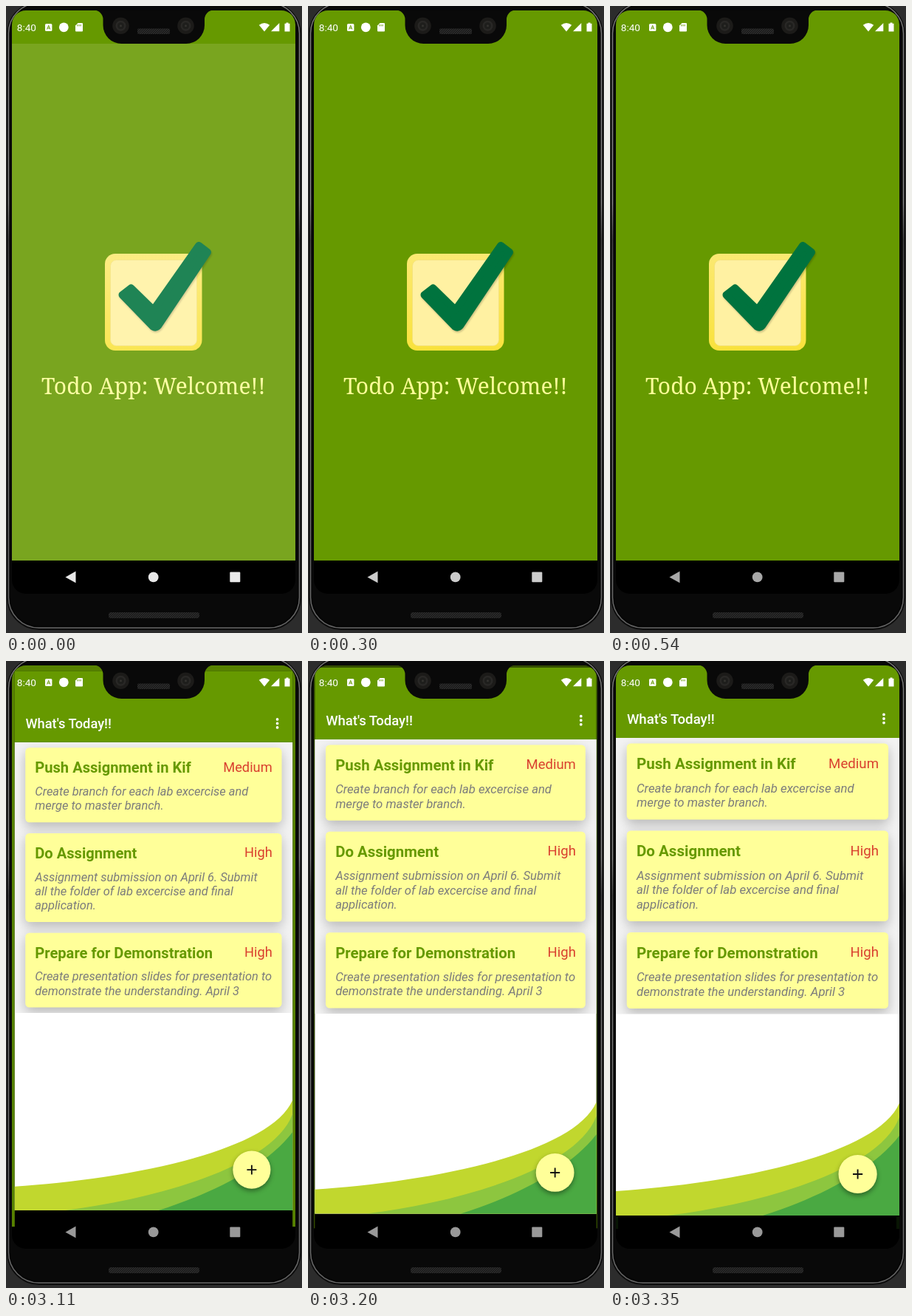
Recreate the animation shown at these times as an HTML page. Size 401 by 848 pixels, loop 5.68 s.

```html
<!DOCTYPE html>
<html lang="en">
<head>
<meta charset="utf-8">
<title>Todo app start</title>
<style>
  html, body { margin: 0; width: 100%; height: 100%; overflow: hidden; background: #2c2c2c; }
  svg { display: block; width: 401px; height: 848px; }
  text { font-family: Roboto, sans-serif; }
  .welcome { font: 30px "Noto Serif", serif; fill: #ff9; text-anchor: middle; }
  .heading { font-size: 18.67px; font-weight: 500; fill: #fff; }
  .clock { font-size: 13.6px; fill: #fff; }
  .task { font-size: 20.53px; font-weight: 700; fill: #690; }
  .priority { font-size: 18.67px; fill: #d9402f; text-anchor: end; }
  .note { font-size: 16.8px; font-style: italic; fill: #7c7c7c; }
  .card { fill: #ff9; filter: drop-shadow(0 6px 8px rgba(0, 0, 0, .25)); }
  .fab { fill: #ff9; filter: drop-shadow(0 3px 3px rgba(0, 0, 0, .4)); }
  .check { fill: #00733e; stroke: #00733e; filter: drop-shadow(1px 2px 1px rgba(0, 0, 0, .2)); }
</style>
</head>
<body>
<svg viewBox="0 0 401 848">
  <defs>
    <clipPath id="screen"><rect x="8" y="6" width="384" height="789" rx="19"/></clipPath>
    <clipPath id="list"><rect x="8" y="104" width="384" height="373.5"/></clipPath>
    <linearGradient id="frame" x2="0" y2="1">
      <stop stop-color="#777"/><stop offset=".32" stop-color="#888"/>
      <stop offset=".38" stop-color="#444"/><stop offset=".6" stop-color="#777"/>
      <stop offset="1" stop-color="#666"/>
    </linearGradient>
    <linearGradient id="box" x2="0" y2="1">
      <stop stop-color="#fbe972"/><stop offset="1" stop-color="#f9e23c"/>
    </linearGradient>
    <pattern id="mesh" width="3" height="3" patternUnits="userSpaceOnUse">
      <rect width="3" height="3" fill="#1b1b1b"/><path d="M0 3L3 0" stroke="#333"/>
    </pattern>
  </defs>

  <!-- Phone body -->
  <rect width="401" height="848" fill="#2c2c2c"/>
  <rect x="1" y="-6" width="399" height="850" rx="44" fill="#0c0c0c"/>
  <rect x="3.5" y="-4" width="394" height="845" rx="41" fill="#060606" stroke="url(#frame)" stroke-width="1.5"/>
  <rect x="6" y="-2" width="389" height="840" rx="38" fill="#090909"/>
  <rect x="139" y="820" width="123" height="8" rx="3" fill="url(#mesh)"/>

  <g clip-path="url(#screen)">
    <rect x="8" y="6" width="384" height="789"/>

    <g id="splash">
      <rect x="8" y="6" width="384" height="744" fill="#690"/>
      <rect x="134" y="335" width="131.5" height="131" rx="14" fill="url(#box)"/>
      <rect x="141.5" y="343.5" width="117" height="116" rx="8" fill="#fff1a2" stroke="#f3e07c" stroke-width=".8"/>
      <path class="check" stroke-width="10" stroke-linejoin="round"
        d="M169.5 381.500L199.8 411L261.200 324L273 333L206.500 432Q203 436 199 433.500L157.500 390.700Z"/>
      <text class="welcome" x="199.7" y="525">Todo App: Welcome!!</text>
      <rect id="veil" x="8" y="51" width="384" height="699" fill="#fff" opacity=".12"/>
      <rect id="dim" x="8" y="6" width="384" height="744"/>
    </g>

    <g id="app">
      <rect x="8" y="6" width="384" height="789"/>
      <rect x="8" y="104" width="384" height="646" fill="#fff"/>
      <path d="M8 750V717C150 708 360 672 392 598V750Z" fill="#c1d72e"/>
      <path d="M78 750C200 735 365 690 392 617V750Z" fill="#8dc63f"/>
      <path d="M207 750C280 727 355 690 392 642V750Z" fill="#4aa942"/>
      <g id="cards" clip-path="url(#list)">
        <rect x="8" y="104" width="384" height="374" fill="#f3f3f3"/>
      </g>
      <rect x="8" y="6" width="384" height="98" fill="#690"/>
      <text class="heading" x="22.9" y="84.6">What's Today!!</text>
      <path d="M371 72.4h0M371 78h0M371 83.6h0" stroke="#fff" stroke-width="3.8" stroke-linecap="round"/>
      <circle class="fab" cx="335.6" cy="694" r="26.1"/>
      <path d="M329 694h13.2M335.6 687.4v13.2" stroke="#111" stroke-width="1.9"/>
    </g>
    <path id="edges" d="M8 752h3v16h-3zM388 752h4v16h-4z" fill="#081504"/>

    <!-- Status bar -->
    <text class="clock" x="14.8" y="33.8">8:40</text>
    <g fill="#fff">
      <rect x="53" y="24" width="9.4" height="10" rx="1.5"/>
      <circle cx="78.3" cy="28.8" r="6.4"/>
      <path d="M97.5 23H103Q104 23 104 24V33.5Q104 34.5 103 34.5H95Q94 34.5 94 33.5V26.5Z"/>
      <path d="M350 34.5L342.8 25.8Q350 20 357.2 25.8Z"/>
      <path d="M370.3 23V34.3H359Z"/>
      <path d="M379.5 22.5h3v1.3h2v10.8h-7V23.8h2z"/>
    </g>
    <path d="M55.6 31.5L57.7 26.3L59.8 31.5M56.3 30h2.8" fill="none" stroke="#690"/>
    <path d="M96.8 25v2.4M99 25v2.4M101.2 25v2.4" stroke="#690" stroke-width=".9"/>

    <!-- Navigation bar -->
    <g id="nav">
      <path d="M94.5 764.6V780.2L80.5 772.4Z"/>
      <circle cx="199.7" cy="772.4" r="6.9"/>
      <rect x="303.3" y="765.4" width="14" height="13.8" rx="1"/>
    </g>
  </g>

  <!-- Notch -->
  <path d="M119 5.5A12.500 12.500 0 0 1 131.500 18V26A25 25 0 0 0 156.500 51H244A25 25 0 0 0 269 26V18A12.500 12.500 0 0 1 281.500 5.500Z" fill="#090909"/>
  <g id="cameras"></g>
  <rect x="178" y="30.5" width="44" height="7.5" rx="2" fill="url(#mesh)"/>
</svg>

<script>
const LOOP = 5680, APP_START = 3110;
const byId = id => document.getElementById(id);

function add(parent, tag, attrs, text = "") {
  const node = document.createElementNS("http://www.w3.org/2000/svg", tag);
  for (const name in attrs) node.setAttribute(name, attrs[name]);
  node.textContent = text;
  parent.append(node);
  return node;
}

const tasks = [
  [111.5, "Push Assignment in Kif", "Medium",
    "Create branch for each lab excercise and", "merge to master branch."],
  [229.5, "Do Assignment", "High",
    "Assignment submission on April 6. Submit", "all the folder of lab excercise and final", "application."],
  [367, "Prepare for Demonstration", "High",
    "Create presentation slides for presentation to", "demonstrate the understanding. April 3"]
];
for (const [top, name, priority, ...lines] of tasks) {
  const cards = byId("cards"), height = 63.8 + 19.6 * lines.length;
  add(cards, "rect", { class: "card", x: 22.7, y: top, width: 354.4, height, rx: 5.5 });
  add(cards, "text", { class: "task", x: 36, y: top + 34.6 }, name);
  add(cards, "text", { class: "priority", x: 364, y: top + 33 }, priority);
  lines.forEach((line, i) =>
    add(cards, "text", { class: "note", x: 36, y: top + 66 + 19.6 * i }, line));
}

for (const cx of [155.5, 243.5])
  for (const [r, fill] of [[11.3, "#1c1b19"], [7, "#292826"], [4.5, "#1e1e1c"], [1.5, "#34332f"]])
    add(byId("cameras"), "circle", { cx, cy: 26.8, r, fill });

// Steps of the screen change: time, app scale, splash scale, splash dimming
const steps = [
  [0, 1, 1, 0],
  [APP_START, .98, 1.043, .15],
  [3200, .993, 1.049, .5],
  [3270, .998, 1.05, .7],
  [3350, 1, 1.05, .8]
];

function navGrey(t) {
  if (t < 70) return 232;
  if (t >= 850) return 153;
  return 222 - 9 * Math.min(6, Math.floor((t - 70) / 78.3));
}

const show = (id, visible) => byId(id).setAttribute("visibility", visible ? "visible" : "hidden");
const zoom = (id, scale) =>
  byId(id).setAttribute("transform", `translate(200 400) scale(${scale}) translate(-200 -400)`);

function draw(t) {
  const [, appScale, splashScale, dimming] = steps.filter(step => step[0] <= t).pop();
  const grey = navGrey(t);
  zoom("app", appScale);
  zoom("splash", splashScale);
  byId("dim").setAttribute("opacity", dimming);
  byId("nav").setAttribute("fill", `rgb(${grey},${grey},${grey})`);
  show("veil", t < 70);
  show("app", t >= APP_START);
  show("edges", t >= 3350);
}

const start = performance.now();
function tick() {
  draw((performance.now() - start) % LOOP);
  requestAnimationFrame(tick);
}
tick();
</script>
</body>
</html>
```
